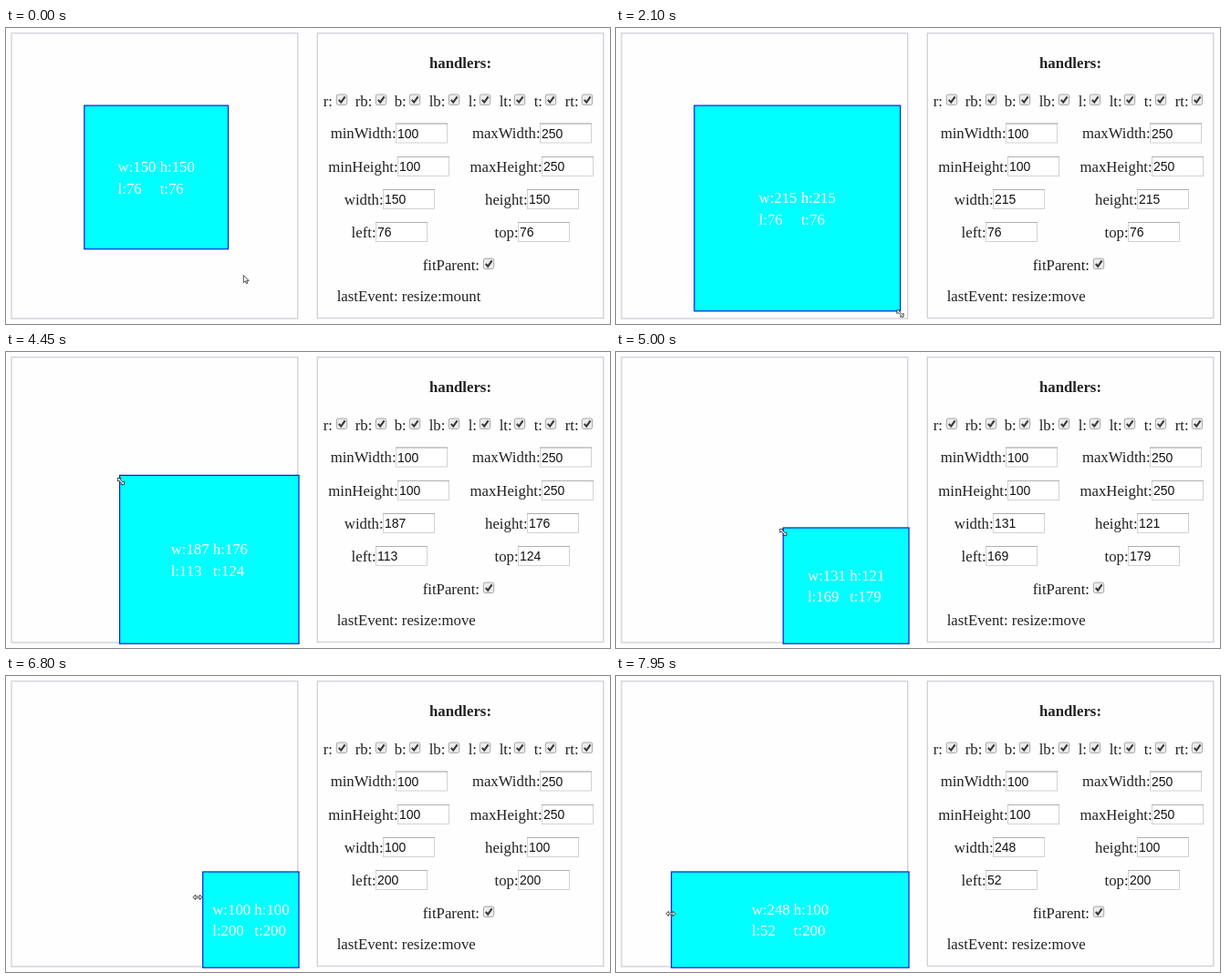
Animation of 662x325 px, one loop 8000 ms. Source, as an HTML page:

```html
<!DOCTYPE html>
<html lang="en">
<head>
<meta charset="utf-8">
<title>Resizable box</title>
<style>
  html, body { margin: 0; width: 100%; height: 100%; overflow: hidden; background: #fefefe; }
  svg { display: block; width: 662px; height: 325px; }
  text { font: 16.76px "Liberation Serif", serif; fill: #222; white-space: pre; }
  .title { font-weight: bold; text-anchor: middle; }
  .label { text-anchor: end; }
  .value { font: 14px "Liberation Sans", sans-serif; fill: #111; }
  .panel { fill: none; stroke: #d3d2dc; stroke-width: 1.4; }
  .field { fill: #fff; stroke: #d2d2d2; }
  #box { fill: #0ff; stroke: #0a1ce0; stroke-width: 1.2; }
  #info text { fill: #fff; }
  #cursor path { fill: #fff; stroke: #222; stroke-width: .8; stroke-linejoin: round; }
</style>
</head>
<body>
<svg id="stage" viewBox="0 0 662 325">
  <rect class="panel" x="6" y="5.7" width="313.7" height="313.3"/>
  <rect class="panel" x="341.3" y="5.7" width="313.5" height="312.8"/>
  <text class="title" x="498" y="43.5">handlers:</text>
  <g id="form"></g>
  <text id="event" x="362.7" y="300"></text>
  <rect id="box"/>
  <g id="info">
    <text id="w" y="-5.5"></text><text id="h" x="46.1" y="-5.5"></text>
    <text id="l" y="17.8"></text><text id="t" x="46.1" y="17.8"></text>
  </g>
  <g id="cursor">
    <path id="arrow" d="M0 0V8L1.9 6.4 3.2 9.2 4.6 8.6 3.4 5.9H5.8Z"/>
    <path id="resizer" d="M-5.2 0L-2.4 -2.6V-.9H2.4V-2.6L5.2 0 2.4 2.6V.9H-2.4V2.6Z"/>
  </g>
</svg>
<script>
const LOOP = 8000, STEP = 50, SCALE = 1.0475, PARENT = 300;
const $ = id => document.getElementById(id);

const checkbox = (x, y) => `
  <rect x="${x - 5.7}" y="${y - 5.7}" width="11.4" height="11.4" rx="2" fill="#ececec" stroke="#a6a6a6"/>
  <path d="M${x - 3.2} ${y + .2}l2.4 2.7 4.4 -6.3" fill="none" stroke="#383838" stroke-width="2.1"/>`;

const field = (name, x, y, value = '') => `
  <text class="label" x="${x + .6}" y="${y + 5.5}">${name}:</text>
  <rect class="field" x="${x + .5}" y="${y - 10.5}" width="56" height="21"/>
  <path d="M${x} ${y - 10.5}h57" stroke="#b0b0b0"/>
  <text class="value" id="${name}" x="${x + 2}" y="${y + 5.2}">${value}</text>`;

const handlers = [['r', 348, 368], ['rb', 383, 411], ['b', 426, 448], ['lb', 464, 491],
  ['l', 507, 525], ['lt', 541, 563], ['t', 579, 597], ['rt', 613, 637]];

$('form').innerHTML =
  handlers.map(([name, x, cx]) => `<text x="${x - .3}" y="86.3">${name}:</text>` + checkbox(cx, 78.7)).join('') +
  field('minWidth', 427, 115.5, 100) + field('maxWidth', 585, 115.5, 250) +
  field('minHeight', 429, 152, 100) + field('maxHeight', 587, 152, 250) +
  field('width', 413, 188) + field('height', 571, 188) +
  field('left', 405, 224) + field('top', 561, 224) +
  '<text x="456.7" y="266.3">fitParent:</text>' + checkbox(529, 258.8);

// time, left, top, right, bottom
const boxKeys = [
  [0, 76, 76, 226, 226], [700, 76, 76, 226, 226], [1500, 76, 76, 262, 263],
  [2300, 76, 76, PARENT, PARENT], [4050, 76, 76, PARENT, PARENT],
  [4450, 113, 124, PARENT, PARENT], [4950, 164, 176, PARENT, PARENT],
  [5300, 200, 200, PARENT, PARENT], [6800, 200, 200, PARENT, PARENT],
  [7300, 130, 200, PARENT, PARENT], [7500, 98, 200, PARENT, PARENT],
  [7950, 52, 200, PARENT, PARENT]];

// time, x, y
const cursorKeys = [
  [0, 260.3, 271.5], [50, 260, 271], [550, 245, 246], [700, 245, 246], [1500, 283, 285],
  [2300, 321, 323], [2450, 321, 323], [3250, 112, 116], [3350, 100.5, 102.5],
  [3700, 86, 88], [4050, 86, 89], [4450, 126, 142], [4950, 178, 194], [5300, 215, 222],
  [5750, 213.5, 235.5], [6200, 230, 238], [6650, 215, 241], [6800, 210, 243],
  [7300, 138, 252], [7500, 108, 255], [7950, 60, 261]];

const cursorKinds = [[0, 'arrow'], [500, 45], [2550, 'arrow'], [3650, 45], [5450, 0]];
const events = [[0, 'mount'], [700, 'start'], [750, 'move'], [2450, 'end'], [4050, 'start'],
  [4100, 'move'], [5400, 'end'], [5650, 'start'], [5700, 'move']];

const current = (keys, time) => keys.findLast(key => key[0] <= time);

function interpolate(keys, time) {
  const from = current(keys, time);
  const to = keys[keys.indexOf(from) + 1] || from;
  const part = to === from ? 0 : (time - from[0]) / (to[0] - from[0]);
  return from.slice(1).map((value, i) => value + (to[i + 1] - value) * part);
}

function setAttributes(node, values) {
  for (const name in values) node.setAttribute(name, values[name]);
}

function draw(time) {
  const [left, top, right, bottom] = interpolate(boxKeys, time).map(Math.round);
  const values = { width: right - left, height: bottom - top, left, top };
  for (const name in values) {
    $(name).textContent = values[name];
    $(name[0]).textContent = `${name[0]}:${values[name]}`;
  }
  $('event').textContent = 'lastEvent: resize:' + current(events, time)[1];

  const x = 6.2 + SCALE * left, y = 5.5 + SCALE * top;
  const width = 6.8 + SCALE * right - x, height = 6 + SCALE * bottom - y;
  setAttributes($('box'), { x, y, width, height });
  $('info').setAttribute('transform', `translate(${x + width / 2 - 42.1} ${y + height / 2})`);

  const kind = current(cursorKinds, time)[1], isArrow = kind === 'arrow';
  const [cx, cy] = interpolate(cursorKeys, time);
  $('cursor').setAttribute('transform', `translate(${cx} ${cy}) rotate(${isArrow ? 0 : kind})`);
  $('arrow').style.display = isArrow ? '' : 'none';
  $('resizer').style.display = isArrow ? 'none' : '';
}

const start = performance.now();
function tick() {
  const elapsed = (performance.now() - start) % LOOP;
  draw(Math.floor(elapsed / STEP) * STEP);
  requestAnimationFrame(tick);
}
tick();
</script>
</body>
</html>
```
